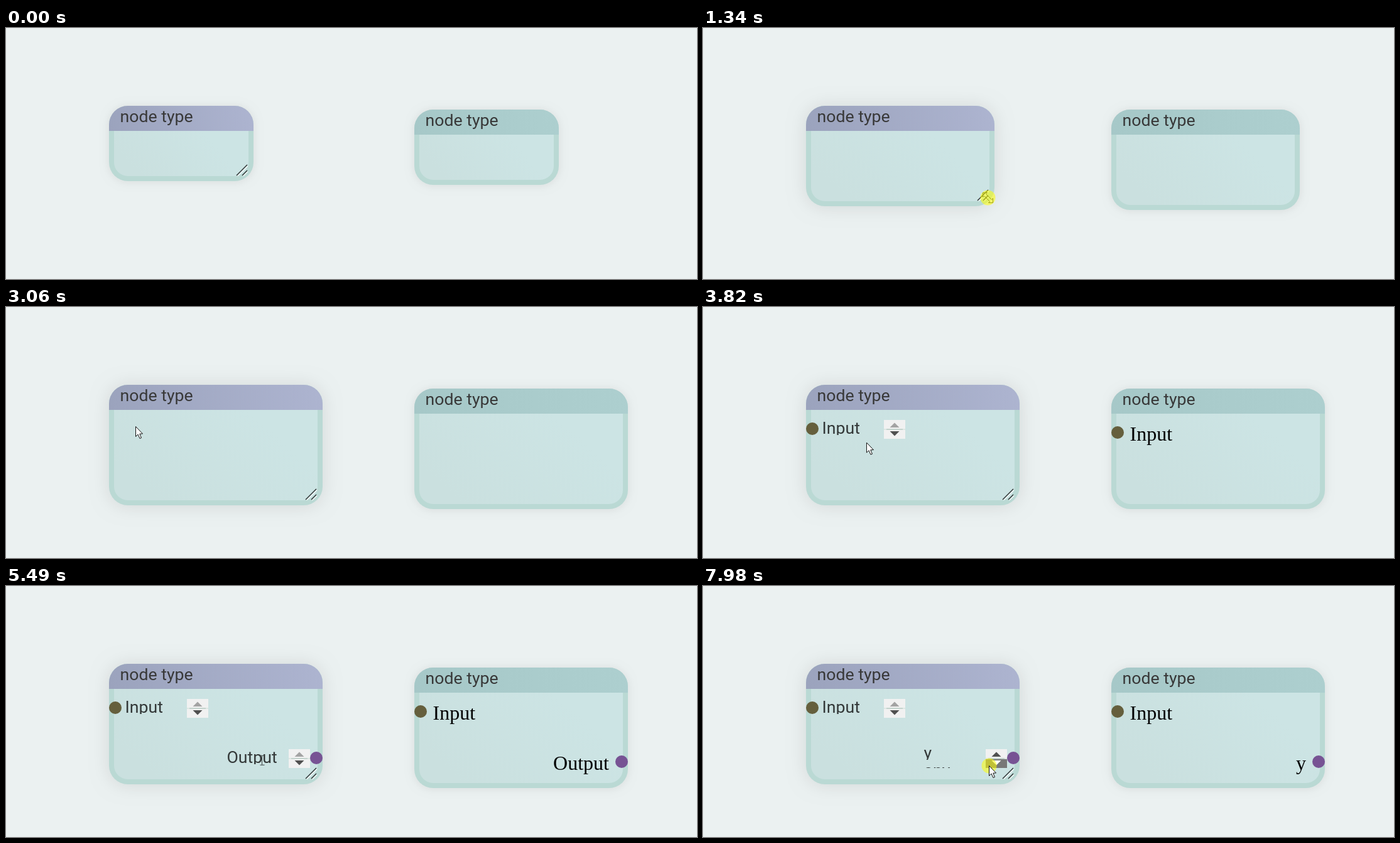
An HTML page with a canvas for the animation above (8 s loop, 1100 px wide and 400 px high).

```html
<!DOCTYPE html>
<html lang="en">
<head>
<meta charset="utf-8">
<title>Node editor</title>
<style>
html, body { margin: 0; width: 100%; height: 100%; overflow: hidden; background: #ebf1f1; }
canvas { display: block; }
</style>
</head>
<body>
<canvas id="stage" width="1100" height="400"></canvas>
<script>
const ctx = document.getElementById('stage').getContext('2d');
const LOOP = 8000;
const SANS = '26.67px Roboto, Arial, sans-serif';
const SERIF = '32px "Liberation Serif", "Times New Roman", serif';

// Bursts of movement: start, end, number of steps
const BURSTS = [
  [40, 840, 9], [940, 1740, 9], [1840, 2560, 9], [2660, 3420, 11], [3520, 4240, 9],
  [4340, 5070, 9], [5170, 5890, 9], [5990, 6710, 14], [6810, 7530, 9], [7630, 7980, 6]
];
// Node size: time, width, height
const SIZE = [[840, 230, 120], [1340, 300, 160], [1740, 340, 192]];
// Pointer: time, x, y, shape from that time on
const POINTER = [
  [40, 480, 357, 'arrow'], [240, 504, 250, 'arrow'], [440, 450, 130, 'arrow'],
  [740, 384, 228, 'resize'], [840, 383, 230, 'resize'], [1340, 453, 270, 'resize'],
  [1740, 491, 299, 'resize'], [1930, 491, 299, 'arrow'], [2560, 245, 213, 'arrow'],
  [2660, 245, 213, 'arrow'], [3010, 206, 190, 'arrow'], [3240, 206, 190, 'text'],
  [3420, 206, 190, 'text'], [3600, 194, 191, 'text'], [3760, 250, 212, 'arrow'],
  [4240, 409, 270, 'arrow'], [4400, 411, 270, 'text'], [4560, 411, 270, 'text'],
  [4690, 402, 222, 'arrow'], [4800, 400, 218, 'arrow'], [4950, 392, 262, 'text'],
  [5070, 390, 270, 'text'], [5500, 410, 279, 'text'], [5890, 425, 276, 'text'],
  [6480, 425, 276, 'text'], [6540, 450, 282, 'arrow'], [6640, 464, 282, 'arrow'],
  [6810, 462, 280, 'arrow'], [7070, 376, 236, 'arrow'], [7250, 376, 236, 'arrow'],
  [7530, 452, 288, 'arrow'], [7630, 454, 291, 'arrow'], [7770, 457, 296, 'arrow'],
  [7910, 455, 286, 'arrow'], [7980, 455, 286, 'arrow']
];
const PRESSES = [[930, 1900], [3110, 3240], [4220, 4340], [7070, 7240], [7900, 8000]];

function stepTime(t) {
  let held = 0;
  for (const [start, end, count] of BURSTS) {
    if (t < start) break;
    const step = (end - start) / (count - 1);
    held = Math.min(end, start + Math.floor((t - start) / step + 1e-6) * step);
  }
  return held;
}

function track(keys, t) {
  let i = 0;
  while (i < keys.length - 1 && keys[i + 1][0] <= t) i++;
  const a = keys[i], b = keys[Math.min(i + 1, keys.length - 1)];
  const k = b === a ? 0 : Math.max(0, (t - a[0]) / (b[0] - a[0]));
  return [a[1] + (b[1] - a[1]) * k, a[2] + (b[2] - a[2]) * k, a[3]];
}

function linear(x0, y0, x1, y1, from, to) {
  const g = ctx.createLinearGradient(x0, y0, x1, y1);
  g.addColorStop(0, from);
  g.addColorStop(1, to);
  return g;
}

function box(x, y, w, h, radii, fill) {
  ctx.beginPath();
  ctx.roundRect(x, y, w, h, radii);
  ctx.fillStyle = fill;
  ctx.fill();
}

function disc(x, y, r, fill) {
  ctx.beginPath();
  ctx.arc(x, y, r, 0, Math.PI * 2);
  ctx.fillStyle = fill;
  ctx.fill();
}

function polygon(points, fill, stroke) {
  ctx.beginPath();
  points.forEach(([x, y]) => ctx.lineTo(x, y));
  ctx.closePath();
  if (fill) { ctx.fillStyle = fill; ctx.fill(); }
  if (stroke) { ctx.strokeStyle = stroke; ctx.lineWidth = 1; ctx.stroke(); }
}

function line(x0, y0, x1, y1, color, width) {
  ctx.beginPath();
  ctx.moveTo(x0, y0);
  ctx.lineTo(x1, y1);
  ctx.strokeStyle = color;
  ctx.lineWidth = width;
  ctx.stroke();
}

function label(text, x, y, font, color, align = 'left') {
  ctx.font = font;
  ctx.fillStyle = color;
  ctx.textAlign = align;
  ctx.fillText(text, x, y);
}

function node(x, y, w, h, head, active) {
  ctx.save();
  ctx.shadowColor = active ? 'rgba(0,0,0,.11)' : 'rgba(0,0,0,.085)';
  ctx.shadowBlur = active ? 28 : 14;
  ctx.shadowOffsetY = 1;
  box(x, y, w, h, 30, '#bad9d4');
  ctx.restore();
  box(x + 8, y + 40, w - 16, h - 48, [0, 0, 22, 22],
    linear(x + w * .25, y + h, x + w * .65, y + 40, '#cae0df', '#cce4e4'));
  box(x, y, w, 40, [30, 30, 0, 0], linear(x, y + 40, x + w, y, ...head));
  label('node type', x + 17.5, y + 26, SANS, '#383838');
}

function grip(right, bottom) {
  for (const reach of [26, 17]) {
    const x = right - reach - 1, y = bottom - reach;
    line(x + 1.5, bottom - 8, right - 9, y + 1.5, '#f4f8f8', 1.5);
    line(x, bottom - 9, right - 10, y, '#343b3b', 1.6);
  }
}

function spinner(x, y, scrolled) {
  box(x, y, 34, 14, 0, '#f1f1f1');
  box(x, y + 16, 34, 14, 0, scrolled ? '#787878' : '#f1f1f1');
  box(x, y + 14, 34, 2, 0, '#dde7e3');
  box(x + 4, y + 14, 26, 2, 0, '#c4d3cd');
  polygon([[x + 9.5, y + 12], [x + 17, y + 4.5], [x + 24.5, y + 12]], scrolled ? '#505050' : '#a3a3a3');
  polygon([[x + 9.5, y + 18], [x + 17, y + 25.5], [x + 24.5, y + 18]], scrolled ? '#fff' : '#505050');
}

function field(x, y, text, second, scroll) {
  const row = (value, top) => {
    ctx.save();
    ctx.beginPath();
    ctx.rect(x, y, 98, 30);
    ctx.clip();
    ctx.beginPath();
    ctx.rect(x, top, 98, 24);
    ctx.clip();
    label(value, x - .5, top + 22, SANS, '#333838');
    ctx.restore();
  };
  row(text, y - scroll);
  if (second) row(second, y + 28 - scroll);
  spinner(x + 98, y, scroll > 0);
}

const SHAPES = {
  arrow(x, y) {
    const points = [[0, 0], [0, 16], [3.5, 12.5], [6.5, 19], [9, 18], [6.3, 11.7], [11, 11.5]];
    polygon(points.map(([dx, dy]) => [x + dx + .5, y + dy + .5]), '#fff', '#111');
  },
  text(x, y) {
    const px = Math.round(x) + .5;
    line(px, y - 7, px, y + 7, '#3a4040', 1);
    for (const s of [-1, 1]) line(px - 3, y + s * 7.5, px + 4, y + s * 7.5, '#3a4040', 1);
  },
  resize(x, y, pressed) {
    const half = [[-8, -8], [-1, -8], [-3, -6], [6, 3], [8, 1], [8, 8], [1, 8], [3, 6], [-6, -3], [-8, -1]];
    polygon(half.map(([dx, dy]) => [x + dx + .5, y + dy + .5]), pressed ? null : '#fff', '#353a2c');
  }
};

function pointer(t) {
  if (t < 40) return;
  const [x, y, shape] = track(POINTER, t);
  const pressed = PRESSES.some(([from, to]) => t >= from && t < to);
  const halo = () => pressed && disc(x + .5, y + .5, 12, 'rgba(255,255,0,.54)');
  if (shape === 'resize') {
    SHAPES.resize(x, y, pressed);
    halo();
  } else {
    halo();
    SHAPES[shape](x, y);
  }
}

function outputText(t) {
  if (t < 5990) return 'Output';
  if (t >= 6370) return 'y';
  return 'Output'.slice(0, Math.max(0, 5 - Math.floor((t - 5990) / 55)));
}

function draw(time) {
  const t = stepTime(time);
  ctx.fillStyle = '#ebf1f1';
  ctx.fillRect(0, 0, 1100, 400);

  const [w, h] = track(SIZE, t).map(Math.round);
  node(164, 124, w, h, ['#9ba3bd', '#adb4d0'], t >= 940);
  node(650, 130, w, h, ['#a6c8c8', '#adcfcf'], false);

  if (t >= 3240) {
    field(190, 180, 'Input', '', 0);
    disc(174, 194, 10, '#655f3d');
    label('Input', 679.5, 213, SERIF, '#000');
    disc(660, 200, 10, '#655f3d');
  }
  if (t >= 4400) {
    field(352, 260, outputText(t), t >= 6370 ? 'any' : '', t >= 7900 ? 7 : 0);
    disc(494, 274, 10, '#775394');
    label(t < 7150 ? 'Output' : 'y', 960, 293, SERIF, '#000', 'right');
    disc(980, 280, 10, '#775394');
  }
  grip(164 + w, 124 + h);
  pointer(t);
}

const began = performance.now();
function tick() {
  draw((performance.now() - began) % LOOP);
  requestAnimationFrame(tick);
}
tick();
</script>
</body>
</html>
```
